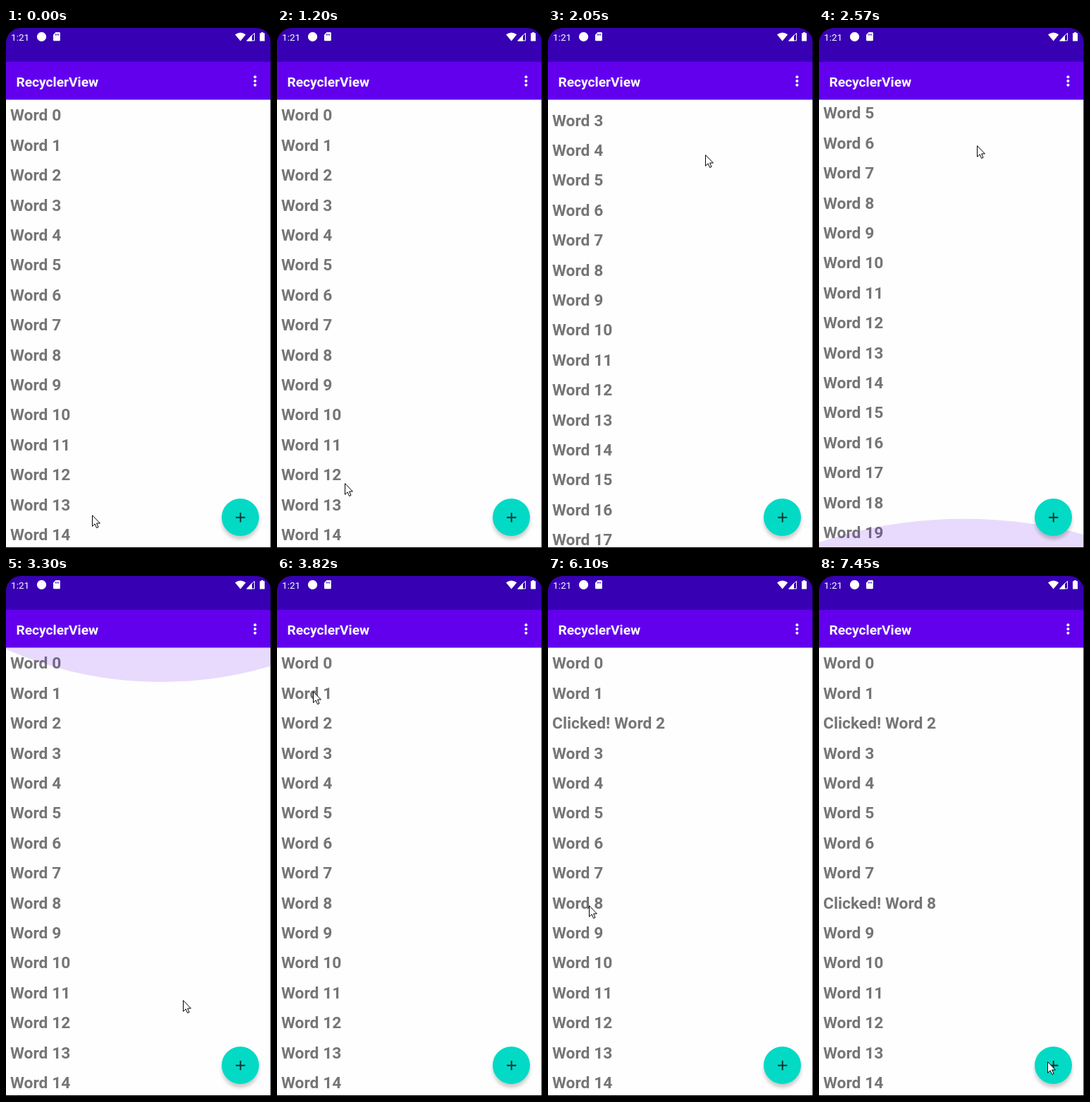
Recreate the animation shown at these times as an HTML page. Size 376 by 736 pixels, loop 8 s.

```html
<!DOCTYPE html>
<html lang="en">
<head>
<meta charset="utf-8">
<title>Word list</title>
<style>
  html, body { margin: 0; width: 100%; height: 100%; overflow: hidden; background: #000; }
  #stage { position: relative; width: 376px; height: 736px; overflow: hidden; background: #000; font-family: Roboto, sans-serif; }
  #stage > * { position: absolute; }
  #status { left: 0; top: 0; width: 376px; height: 48px; background: #3700b3; border-radius: 21px 21px 0 0; }
  #bar { left: 0; top: 48px; width: 376px; height: 53px; background: #6200ee; box-shadow: 0 1px #b080f6; }
  #list { left: 0; top: 101px; width: 376px; height: 634px; overflow: hidden; background: #fefefe; }
  #rows { position: absolute; left: 6px; top: 0; will-change: transform; }
  #rows div { position: absolute; white-space: pre; font: 700 22.8px/30px Roboto, sans-serif; color: #757575; }
  #glow { position: absolute; left: 0; top: 0; }
  #fab { left: 306px; top: 666px; width: 53px; height: 53px; border-radius: 50%; background: #03dac5; box-shadow: 0 5px 5px rgba(0, 0, 0, .2); }
  #edge { right: 0; top: 0; width: 1px; height: 736px; background: rgba(0, 0, 0, .7); }
  #icons, #cursor { left: 0; top: 0; }
</style>
</head>
<body>
<div id="stage">
  <div id="status"></div>
  <div id="list">
    <div id="rows"></div>
    <svg id="glow" width="376" height="634"><ellipse rx="451" fill="#6200ee" fill-opacity=".14"/></svg>
  </div>
  <div id="bar"></div>
  <div id="fab"></div>
  <svg id="icons" width="376" height="736" fill="#fff" font-family="Roboto, sans-serif">
    <text x="7" y="17.6" font-size="13.6">1:21</text>
    <circle cx="50.5" cy="12.4" r="6.6"/>
    <path d="M70.4 6H75.6Q76.8 6 76.8 7.2V17Q76.8 18.2 75.6 18.2H68.2Q67 18.2 67 17V9.4Z"/>
    <path d="M70.2 8.2V10.6M72.3 8.2V10.6M74.4 8.2V10.6" stroke="#3700b3" stroke-width="1.1"/>
    <path d="M325 9.2Q332.6 3.6 340.2 9.2L332.6 18.4Z"/>
    <path d="M352.5 7.2V17.9H342Z" fill="none" stroke="#fff"/>
    <path d="M349 9.8V18.4H340.8Z"/>
    <path d="M362 6H365V7.2H367V18.4H360V7.2H362Z"/>
    <text x="14.4" y="82.6" font-size="19.2" font-weight="700">RecyclerView</text>
    <circle cx="353.4" cy="69.2" r="2"/>
    <circle cx="353.4" cy="75" r="2"/>
    <circle cx="353.4" cy="80.8" r="2"/>
    <path d="M326 692.7H339.4M332.7 686V699.4" stroke="#16302d" stroke-width="1.9"/>
  </svg>
  <div id="edge"></div>
  <svg id="cursor" width="14" height="21">
    <path d="M.5 .7V16.3L4.1 12.9L6.6 18.5L9 17.4L6.6 12H11.4Z" fill="#fff" stroke="#000"/>
  </svg>
</div>
<script>
// The screen refreshes in coarse ticks; all motion is sampled on them.
const LOOP = 8000, FIRST_TICK = 1180, TICK = 138.9;
const PITCH = 42.4, BASELINE = 31.4;
const MAX_SCROLL = 215, DRAG_LAG = .76, DRAG_UP = 4, DRAG_DOWN = 12, RELEASE = 16;
const GLOW_RADIUS = 451, GLOW_HEIGHT = 60.4, LIST_HEIGHT = 634;

const easeOut = power => u => 1 - (1 - u) ** power;
const swipe = u => u < .5 ? 16 * u ** 5 : 1 - 16 * (1 - u) ** 5;
const clamp = (v, low, high) => Math.min(high, Math.max(low, v));

// The pointer's path: first tick, last tick, destination, easing
const home = { x: 122, y: 689 };
const pressed = { x: 187, y: 606 };
const lifted = { x: 224, y: 166 };
const path = [
  [-1, 0, { x: 96, y: 644 }, swipe],
  [0, DRAG_UP, pressed, easeOut(2)],
  [DRAG_UP, 6.8, lifted, swipe],
  [DRAG_DOWN, 16.1, { x: 252, y: 610 }, swipe],
  [16.1, 20, { x: 47, y: 155 }, swipe],
  [20, 23, { x: 47, y: 204 }, swipe],
  [29, 35, { x: 58, y: 466 }, easeOut(2)],
  [40, 45, { x: 324, y: 687 }, easeOut(5)]
];
const clicks = { 2: 4940, 8: 6510 };

const $ = id => document.getElementById(id);
const rowsBox = $('rows'), cursor = $('cursor'), glow = $('glow').firstElementChild;
const rows = Array.from({ length: 20 }, (_, i) => {
  const row = document.createElement('div');
  row.style.top = BASELINE - 23 + i * PITCH + 'px';
  return rowsBox.appendChild(row);
});

function pointerAt(tick) {
  let { x, y } = home;
  for (const [from, to, end, ease] of path) {
    const k = ease(clamp((tick - from) / (to - from), 0, 1));
    x += (end.x - x) * k;
    y += (end.y - y) * k;
  }
  return { x, y };
}

// The list trails the dragging pointer and stops at its ends.
function scrollAt(tick) {
  const { y } = pointerAt(Math.min(tick - DRAG_LAG, RELEASE));
  const offset = tick < DRAG_DOWN ? pressed.y - y : MAX_SCROLL + lifted.y - y;
  return Math.round(clamp(offset, 0, MAX_SCROLL));
}

// An overscroll glow holds its size, then drops away within four ticks.
function drawGlow(tick) {
  const atTop = tick >= DRAG_DOWN;
  const age = (tick - (atTop ? 15 : 7)) / 4;
  const size = age >= 0 && age < 1 ? .81 * (1 - age ** 6) : 0;
  const ry = GLOW_RADIUS * size, center = GLOW_HEIGHT * size - ry;
  glow.setAttribute('ry', ry);
  glow.setAttribute('cx', atTop ? 220 : 206);
  glow.setAttribute('cy', atTop ? center : LIST_HEIGHT - center);
}

function draw(now) {
  const t = now % LOOP;
  const tick = Math.floor((t - FIRST_TICK) / TICK);
  const { x, y } = pointerAt(tick);
  cursor.style.transform = `translate(${Math.round(x)}px, ${Math.round(y)}px)`;
  rowsBox.style.transform = `translateY(${-scrollAt(tick)}px)`;
  drawGlow(tick);
  rows.forEach((row, i) => {
    const label = (t >= clicks[i] ? 'Clicked! ' : '') + 'Word ' + i;
    if (row.textContent !== label) row.textContent = label;
  });
}

const start = performance.now();
function frame() {
  draw(performance.now() - start);
  requestAnimationFrame(frame);
}
frame();
</script>
</body>
</html>
```
